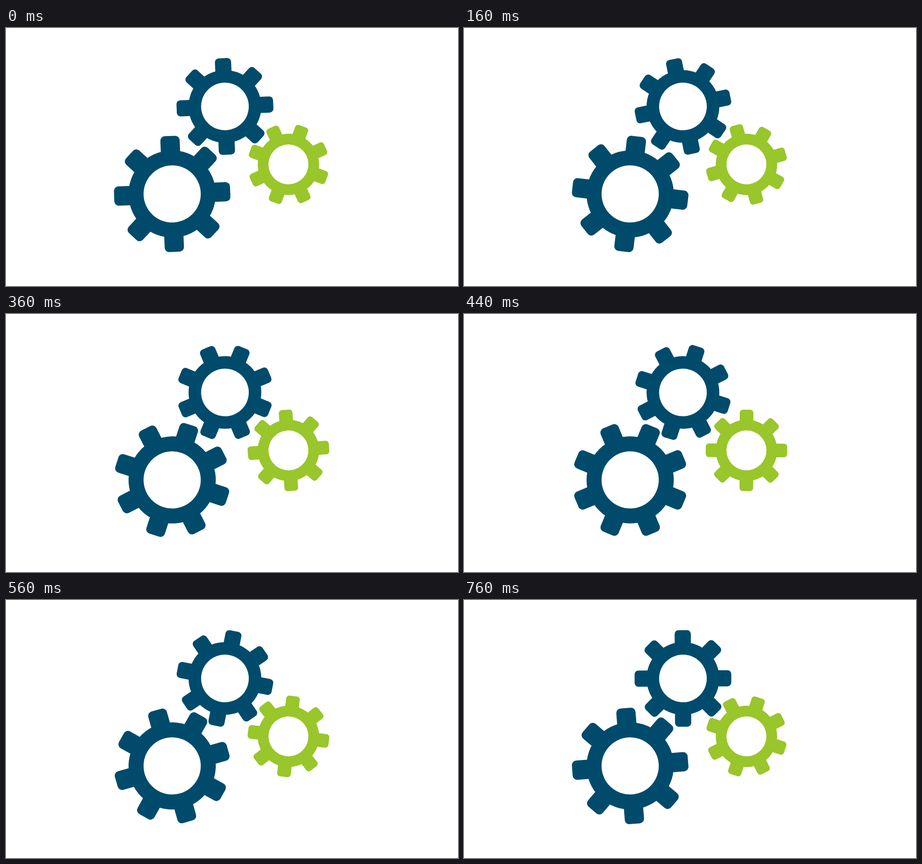
These frames come from a looping animation (948 by 542 pixels, 800 ms). An HTML page with a canvas:

```html
<!DOCTYPE html>
<html lang="en">
<head>
<meta charset="utf-8">
<title>Turning gears</title>
<style>
  html, body { margin: 0; width: 100%; height: 100%; overflow: hidden; background: #fff; }
  canvas { display: block; }
</style>
</head>
<body>
<canvas id="stage" width="948" height="542"></canvas>
<script>
const ctx = document.getElementById('stage').getContext('2d');

const TEETH = 8;
const STEPS = 20;
const STEP_MS = 40;
const PITCH = 360 / TEETH;
const BLUE = '#004b6b';
const GREEN = '#98c62b';

// Angles in degrees; spin is 1 for clockwise, -1 for counterclockwise.
const gears = [
  { x: 348.5, y: 348.6, tip: 121.8, body: 91.5, hole: 60, tooth: 40.5, corner: 9.5, start: -2.3, spin: 1, color: BLUE },
  { x: 459.2, y: 164.8, tip: 101.4, body: 76.3, hole: 50, tooth: 34, corner: 8, start: -2.5, spin: -1, color: BLUE },
  { x: 592.4, y: 286.5, tip: 85.4, body: 64.4, hole: 41.9, tooth: 28.6, corner: 6.5, start: 20.4, spin: 1, color: GREEN }
];

function disc(radius, color) {
  ctx.fillStyle = color;
  ctx.beginPath();
  ctx.arc(0, 0, radius, 0, Math.PI * 2);
  ctx.fill();
}

function drawGear(gear, turn) {
  ctx.save();
  ctx.translate(gear.x, gear.y);
  ctx.rotate((gear.start + gear.spin * turn) * Math.PI / 180);
  disc(gear.body, gear.color);
  for (let i = 0; i < TEETH; i++) {
    ctx.beginPath();
    ctx.roundRect(-gear.tooth / 2, -gear.tip, gear.tooth, gear.tip - gear.hole, [gear.corner, gear.corner, 0, 0]);
    ctx.fill();
    ctx.rotate(Math.PI * 2 / TEETH);
  }
  disc(gear.hole, '#fff');
  ctx.restore();
}

// One loop advances every gear by one tooth, in even steps.
function render(now) {
  const step = Math.floor(now / STEP_MS) % STEPS;
  ctx.fillStyle = '#fff';
  ctx.fillRect(0, 0, 948, 542);
  for (const gear of gears) drawGear(gear, PITCH * step / STEPS);
}

let origin = null;
function tick(now) {
  if (origin === null) origin = now;
  render(now - origin);
  requestAnimationFrame(tick);
}

render(0);
requestAnimationFrame(tick);
</script>
</body>
</html>
```
